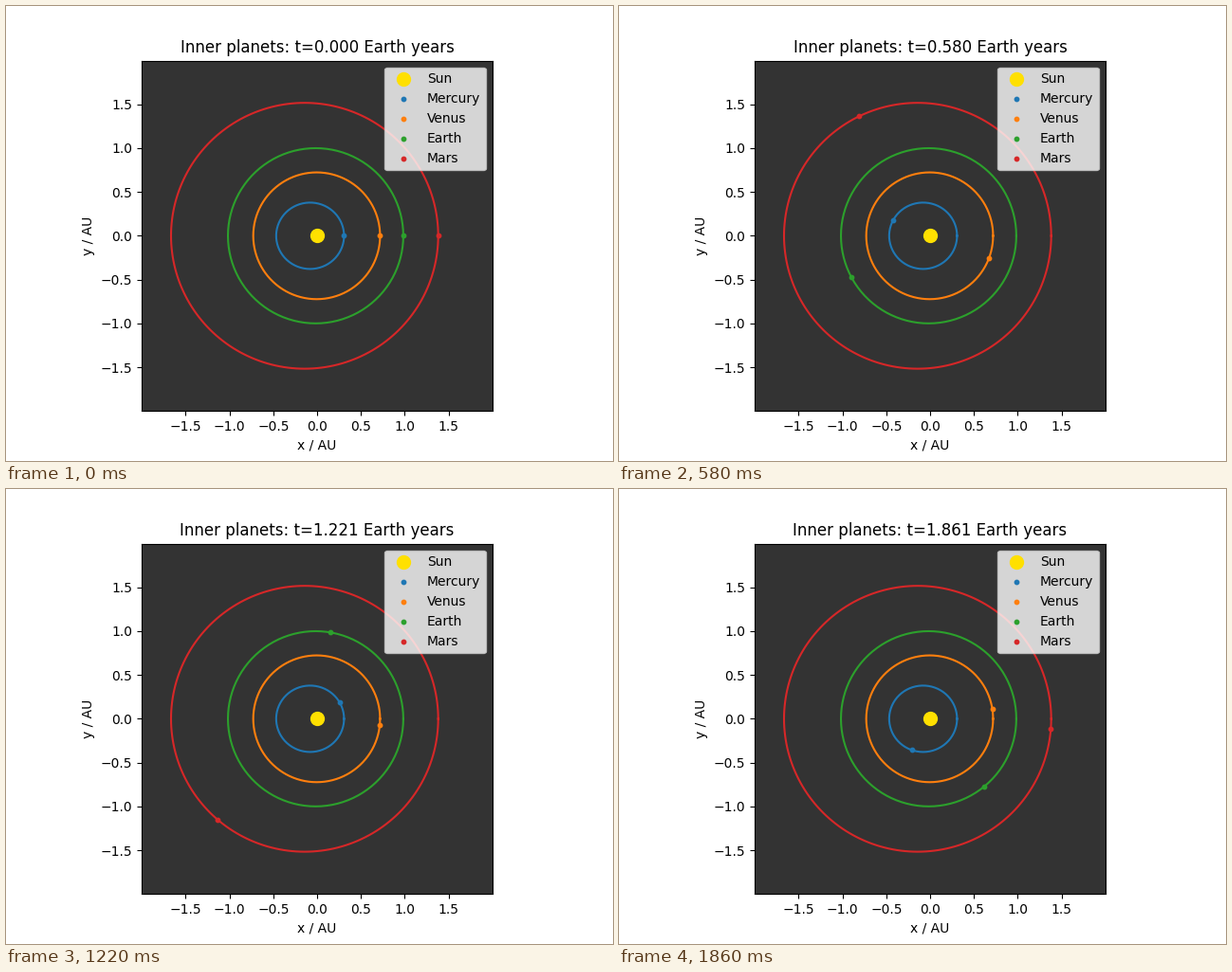
Write a matplotlib script that moves like this. It is 640 px wide and 480 px high and loops after 1.88 s.

```python
import numpy as np
import matplotlib.pyplot as plt
from matplotlib.animation import FuncAnimation

FRAMES = 94
INTERVAL = 20  # ms

# name: semi-major axis in AU, eccentricity
PLANETS = {
    "Mercury": (0.38710, 0.20563),
    "Venus": (0.72333, 0.00677),
    "Earth": (1.00000, 0.01671),
    "Mars": (1.52368, 0.09340),
}


def ellipse(a, e, E):
    """Point at eccentric anomaly E, with the Sun in the focus."""
    return a * (np.cos(E) - e), a * np.sqrt(1 - e * e) * np.sin(E)


def position(a, e, t):
    """Solve Kepler's equation for a planet at time t in years."""
    M = 2 * np.pi * t / a**1.5
    E = M
    for _ in range(8):
        E -= (E - e * np.sin(E) - M) / (1 - e * np.cos(E))
    return ellipse(a, e, E)


a_mars, e_mars = PLANETS["Mars"]
step = a_mars**1.5 / FRAMES
limit = 1.2 * a_mars * (1 + e_mars)

fig, ax = plt.subplots(figsize=(6.4, 4.8), dpi=100)
ax.set_facecolor("0.2")
ax.set_aspect("equal")
ax.set(xlim=(-limit, limit), ylim=(-limit, limit), xlabel="x / AU", ylabel="y / AU")
title = ax.set_title("")

ax.scatter(0, 0, s=100, color="#ffe000", label="Sun")
anomaly = np.linspace(0, 2 * np.pi, 201)
dots = {}
for i, (name, (a, e)) in enumerate(PLANETS.items()):
    ax.plot(*ellipse(a, e, anomaly), color=f"C{i}")
    dots[name] = ax.scatter(*position(a, e, 0), s=10, color=f"C{i}", label=name)

legend = ax.legend(loc="upper right")
fig.draw_without_rendering()
corner = legend.get_window_extent().transformed(ax.transData.inverted())


def update(i):
    t = i * step
    for name, orbit in PLANETS.items():
        dots[name].set_offsets([position(*orbit, t)])
    # The legend makes way while Mars passes behind it.
    hidden = corner.contains(*position(a_mars, e_mars, t))
    legend.set_loc("lower right" if hidden else "upper right")
    title.set_text(f"Inner planets: t={t:.3f} Earth years")
    return [*dots.values(), legend, title]


anim = FuncAnimation(fig, update, frames=FRAMES, interval=INTERVAL, repeat=True)
plt.show()
```
